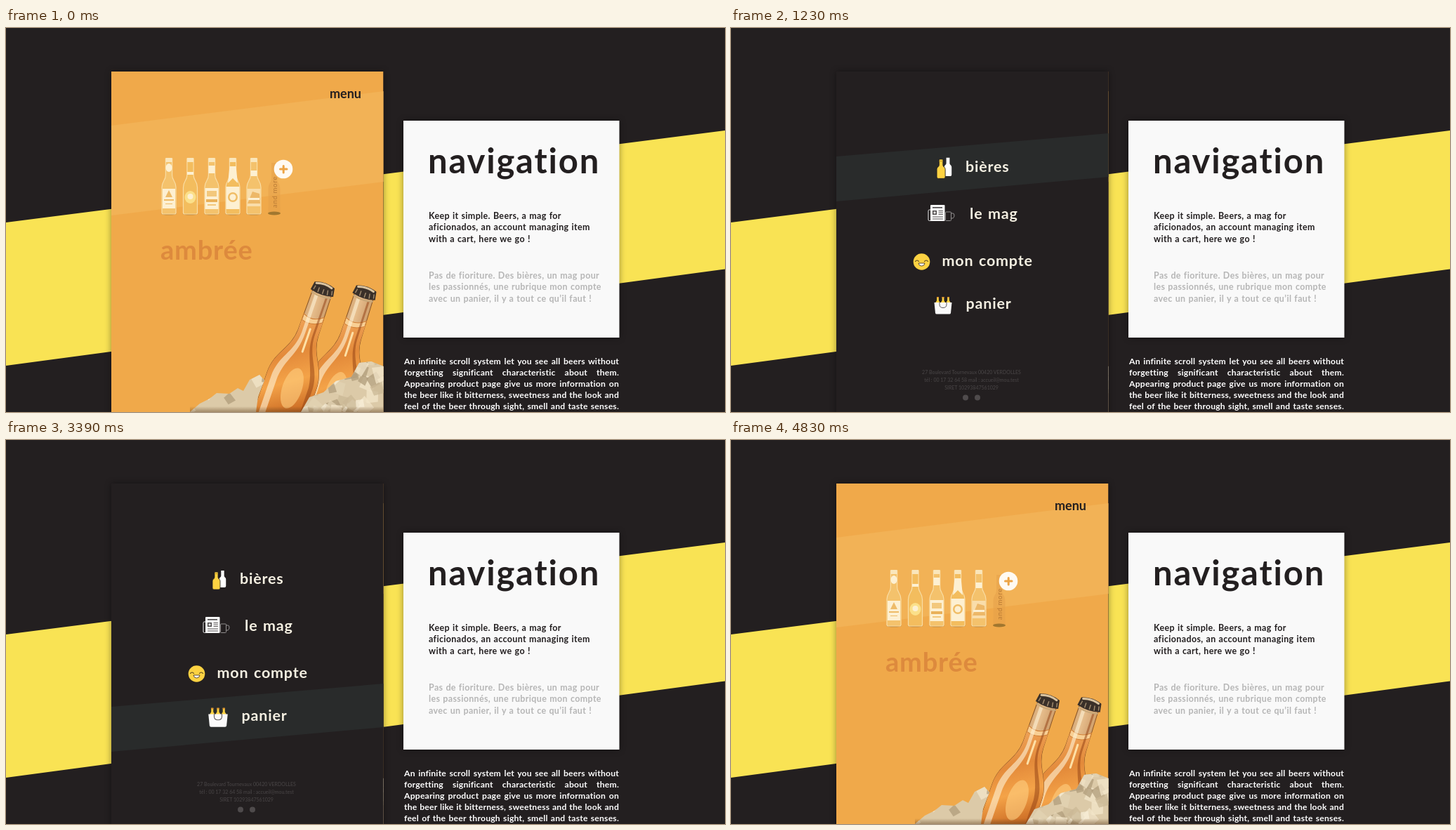
Animation of 1024 by 547 pixels, one loop 6300 ms. Source, as an HTML page:

```html
<!DOCTYPE html>
<html lang="fr">
<head>
<meta charset="utf-8">
<title>Navigation</title>
<style>
html, body { margin: 0; width: 100%; height: 100%; overflow: hidden; background: #231f20; }
body { position: relative; font-family: Lato, "Open Sans", sans-serif; font-weight: 700; }
svg { position: absolute; left: 0; top: 0; }
.shadow { filter: drop-shadow(0 0 5px #0006); }
.copy { font-size: 12.5px; letter-spacing: .35px; word-spacing: .6px; }
.item { font-size: 21.5px; letter-spacing: .8px; word-spacing: 1.5px; fill: #f5f0e2; }
.legal { font-size: 7px; font-weight: 400; fill: #4a4647; text-anchor: middle; }
#notes { position: absolute; left: 567px; top: 467px; width: 306px; color: #fff;
  font-size: 12.2px; letter-spacing: .2px; line-height: 16px; }
#notes div { white-space: nowrap; text-align: justify; text-align-last: justify; }
</style>
</head>
<body>
<svg id="stage" width="1024" height="547" viewBox="0 0 1024 547"></svg>
<div id="notes">
  <div>An infinite scroll system let you see all beers without</div>
  <div>forgetting significant characteristic about them.</div>
  <div>Appearing product page give us more information on</div>
  <div>the beer like it bitterness, sweetness and the look and</div>
  <div>feel of the beer through sight, smell and taste senses.</div>
</div>
<script>
const LOOP = 6300, WIDTH = 387.5;
const DARK = '#231f20', ORANGE = '#f0a94a', YELLOW = '#fcd242';

const rect = (x, y, w, h, fill, extra = '') =>
  `<rect x="${x}" y="${y}" width="${w}" height="${h}" fill="${fill}" ${extra}/>`;
const poly = (points, fill, extra = '') => `<polygon points="${points}" fill="${fill}" ${extra}/>`;
const path = (d, fill, extra = '') => `<path d="${d}" fill="${fill}" ${extra}/>`;
const line = (d, color, width) =>
  path(d, 'none', `stroke="${color}" stroke-width="${width}" stroke-linecap="round"`);
const ellipse = (x, y, rx, ry, fill, extra = '') =>
  `<ellipse cx="${x}" cy="${y}" rx="${rx}" ry="${ry}" fill="${fill}" ${extra}/>`;
const text = (x, y, s, attrs = '') => `<text x="${x}" y="${y}" ${attrs}>${s}</text>`;
const lines = (x, y, step, list, attrs) =>
  list.map((s, i) => text(x, y + i * step, s, attrs)).join('');

// Bottle outline standing on top + h
function bottle(cx, top, w, h, fill, extra) {
  const n = w * .23, b = w / 2, neck = top + h * .3, body = top + h * .52, end = top + h;
  return path(`M${cx - n} ${top}H${cx + n}V${neck}C${cx + n} ${top + h * .4} ${cx + b} ${top + h * .4} ${cx + b} ${body}
    V${end - 2}Q${cx + b} ${end} ${cx + b - 2} ${end}H${cx - b + 2}Q${cx - b} ${end} ${cx - b} ${end - 2}
    V${body}C${cx - b} ${top + h * .4} ${cx - n} ${top + h * .4} ${cx - n} ${neck}Z`, fill, extra);
}

function shelf() {
  const cream = '#fdf0d2';
  const labels = [
    x => rect(x - 9, 229, 18, 28, cream) + poly(`${x},231 ${x + 5},241 ${x - 5},241`, '#eebb68')
      + rect(x - 7, 244, 14, 2, '#eebb68') + rect(x - 5, 250, 10, 1, '#eebb68') + ellipse(x, 199, 4.5, 6, cream),
    x => ellipse(x, 241, 8, 9, '#fbe08a') + ellipse(x, 240, 4, 4, cream) + rect(x - 4.5, 205, 9, 4, cream),
    x => rect(x - 9.5, 228, 19, 30, cream) + rect(x - 7, 232, 14, 8, '#f3c87c')
      + rect(x - 8, 244, 16, 4, '#e9b15a') + rect(x - 6, 251, 12, 2, '#f3c87c') + rect(x - 4.5, 196, 9, 11, cream),
    x => rect(x - 9.5, 226, 19, 32, cream) + ellipse(x, 241, 7, 7, '#f0bd66') + ellipse(x, 241, 4.5, 4.5, cream)
      + poly(`${x - 4.5},197 ${x + 4.5},197 ${x + 7},221 ${x},214 ${x - 7},221`, cream),
    x => rect(x - 9.5, 229, 19, 25, '#f9ddaa') + poly(`${x - 9},250 ${x - 2},233 ${x + 8},236 ${x + 9},250`, '#edb868')
      + rect(x - 8, 242, 16, 3, cream) + rect(x - 4.5, 203, 9, 8, cream)
  ];
  return [232, 262.5, 293, 323, 353].map((x, i) =>
    ellipse(x, 264.5, 11, 2, '#a97d3d', 'opacity=".7"')
    + bottle(x, 186, 20, 79, i % 2 ? '#f3bd5e' : '#f4c26c', 'stroke="#f9dda4" stroke-width="1.2"')
    + rect(x - 4.5, 185, 9, 6, '#fae6bb') + labels[i](x)).join('')
    + bottle(382, 192, 17, 72, '#e5a04a', 'opacity=".55"')
    + ellipse(382, 264, 9, 2.5, '#a1772f')
    + text(0, 0, 'and more', 'transform="translate(386 256) rotate(-90)" font-size="9.5" letter-spacing=".7" font-weight="400" fill="#b87a35"')
    + ellipse(395, 201, 13.3, 13.3, '#fffaf2')
    + line('M390.5 201h9.500M395.200 196.500v9.500', '#eda445', 3);
}

function ice() {
  let seed = 7, out = '';
  const rnd = () => (seed = seed * 16807 % 2147483647) / 2147483647;
  const tones = ['#f8efd9', '#e3d3b3', '#cbb996', '#f3e6ca', '#b09c7b'];
  for (let i = 0; i < 75; i++) {
    const x = 262 + rnd() * 280, y = 470 + rnd() * 80, r = 6 + rnd() * 9, turn = rnd() * 6.3;
    const corners = [0, 1, 2, 3].map(k => {
      const a = turn + k * 1.57 + rnd() * .5;
      return (x + r * Math.cos(a)).toFixed(1) + ',' + (y + r * Math.sin(a)).toFixed(1);
    });
    out += poly(corners.join(' '), tones[i % 5], 'opacity=".75"');
  }
  return `<g clip-path="url(#heap)">${rect(255, 460, 290, 90, '#dccaa8')}${out}</g>`;
}

// Beer bottle hanging from its cap, leaning by angle
function glass(x, y, angle) {
  return `<g transform="translate(${x} ${y}) rotate(${angle})">
    ${path('M-14 8L-15 68C-16 98 -37 108 -37 140V215H37V140C37 108 16 98 15 68L14 8Z', 'url(#glass)', 'stroke="#8a5526" stroke-width="1"')}
    ${path('M-15 50Q0 56 15 46V68C16 98 37 108 37 140V215H-37V140C-37 108 -16 98 -15 68Z', 'url(#beer)')}
    ${path('M-14.500 44Q0 52 14.500 40V48Q0 58 -14.500 53Z', '#f8cf94', 'stroke="#d07f35" stroke-width="1"')}
    ${path('M-9 13L-9 70C-10 102 -30 112 -30 144V215H-21V146C-21 116 -4 104 -4 70V13Z', '#fff3d8', 'opacity=".6"')}
    ${path('M10 12V70C11 100 31 112 32 142V212H26V142C23 114 8 100 7 70V12Z', '#8f3f12', 'opacity=".5"')}
    ${ellipse(4, 150, 14, 30, '#ffcf80', 'opacity=".6"')}
    ${line('M1 62V96', '#ffe0a6', 3)}
    ${path('M-15 -4Q0 -10 15 -4L17 8Q0 13 -17 8Z', '#3a3029')}
    ${line('M-12 -3Q0 -7 11 -3', '#d9c3a0', 3)}
    ${line('M-13 6l1 -5M-6 8v-6M1 8.500v-6M8 8l-1 -6M14 6l-1 -5', '#a08a6d', 1.5)}
    ${line('M-14 11Q0 15 14 11', '#c9a878', 2)}
  </g>`;
}

const page = rect(150, 62, WIDTH, 485, ORANGE)
  + poly('150,139 538,90 538,219 150,267', '#f2b256')
  + text(461, 100, 'menu', `font-size="18" fill="${DARK}"`)
  + shelf()
  + text(220, 330, 'ambrée', 'font-size="38" letter-spacing=".8" fill="#dd8a3d"')
  + glass(512, 375, 18) + glass(452.5, 370, 19) + ice()
  + rect(262, 539, 276, 8, 'url(#floor)');

// Menu entries: band top, label position, icon centre and drawing
const items = [
  { band: 150, x: 333, y: 205, label: 'bières', cx: 303.5, cy: 199,
    icon: bottle(308.5, 186, 9.5, 24, '#fff') + bottle(299.5, 188, 11, 25, YELLOW, `stroke="${DARK}" stroke-width=".8"`)
      + rect(297, 190, 5, 1, '#c59a24') },
  { band: 217, x: 340, y: 272, label: 'le mag', cx: 0, cy: 0,
    icon: rect(281, 259, 5, 15.5, DARK, 'rx="1.5" stroke="#e8e8e8"') + rect(284, 252, 20.5, 23, '#fafafa', 'rx="1"')
      + rect(287, 255, 14, 1.6, '#4a4748') + rect(287, 260, 6, 6, '#4a4748') + rect(288.5, 261.5, 3, 3, '#fafafa')
      + line('M296 260.5h5.5M296 263h5.5M296 265.5h5.5M287.5 269h14M287.5 272h14', '#5d595a', 1)
      + `<g id="empty">${rect(305.5, 262, 8, 12.5, DARK, 'rx="1" stroke="#918e8e"')}${line('M314 264h2q2 0 2 3t-2 4h-2', '#918e8e', 1)}</g>`
      + `<g id="full">${line('M315 263h2.5q2.5 0 2.5 4t-2.5 5H315', '#fff', 1.6)}${rect(305.5, 260, 10, 15.5, YELLOW, 'rx="1.5"')}`
      + line('M308.5 264v8M312.5 264v8', '#e2a92c', 1)
      + path('M305 262v-2q0-3 3-3q3-2 5 0q3 0 3 3v2q-2 1-3-.5q-2 2-4 0q-2 2-4 .5Z', '#fff') + '</g>' },
  { band: 286, x: 300.5, y: 339, label: 'mon compte', cx: 271.5, cy: 333,
    icon: ellipse(271.5, 333, 11.8, 11.8, YELLOW) + line('M262.5 332.5q2.5-3 5 0M275.5 332.5q2.5-3 5 0', '#4c3a1b', 1.1)
      + path('M267 335h9q-.5 4-4.5 4t-4.5-4Z', '#fff', 'stroke="#4c3a1b" stroke-width=".9"') },
  { band: 347, x: 334.5, y: 400, label: 'panier', cx: 302, cy: 396,
    icon: [294.5, 302, 309.5].map(x => bottle(x, 383, 6, 16, YELLOW) + rect(x - 1.5, 383, 3, 1.5, '#e08f2c')).join('')
      + path('M289.5 391H314.5L313 406Q312.8 407.5 311 407.5H293Q291.2 407.5 291 406Z', '#fafafa')
      + line('M297 391v3q0 4.5 5 4.5t5-4.5v-3', '#5d595a', 1) }
];

const menu = rect(150, 62, WIDTH + 2, 485, DARK)
  + items.map(m => poly(`150,${m.band + 33} 538,${m.band} 538,${m.band + 62} 150,${m.band + 97}`, '#292b2b', 'class="band"')).join('')
  + items.map(m => `<g class="icon">${m.icon}</g>${text(m.x, m.y, m.label, 'class="item"')}`).join('')
  + lines(342.5, 492.5, 11, ['27 Boulevard Tournevaux 00420 VERDOLLES',
    'tél : 00 17 32 64 58 mail : accueil@mou.test', 'SIRET 10293847561029'], 'class="legal"')
  + ellipse(334, 526.5, 4, 4, '#4f4b4c') + ellipse(351, 526.5, 4, 4, '#4f4b4c');

const stage = document.getElementById('stage');
stage.innerHTML = `<defs>
    <clipPath id="screen">${rect(150, 62, WIDTH, 485, DARK)}</clipPath>
    <clipPath id="heap">${path('M262 547L276 535L290 528L300 520L318 521L330 513L338 517L347 501L361 494L368 502L359 525L356 547ZM420 547L432 526L452 519L470 503L492 497L503 477L520 475L538 482V547Z')}</clipPath>
    <linearGradient id="glass">
      <stop offset="0" stop-color="#b98450"/><stop offset=".45" stop-color="#e6bd8c"/>
      <stop offset="1" stop-color="#b47a45"/></linearGradient>
    <linearGradient id="beer" x1="0" y1="0" x2=".3" y2="1">
      <stop offset="0" stop-color="#f2ab62"/><stop offset=".4" stop-color="#e38a3a"/>
      <stop offset=".65" stop-color="#f4a348"/><stop offset="1" stop-color="#c25f1c"/></linearGradient>
    <linearGradient id="floor" x1="0" y1="0" x2="0" y2="1">
      <stop offset="0" stop-color="#5a3a18" stop-opacity="0"/><stop offset="1" stop-color="#5a3a18" stop-opacity=".45"/></linearGradient>
  </defs>
  ${rect(0, 0, 1024, 547, DARK)}
  ${poly('0,277 1024,146 1024,343.5 0,481', '#f9e354')}
  ${rect(150, 62, WIDTH, 500, DARK, 'class="shadow"')}
  ${rect(566, 132, 307.5, 309, '#f9f9f9', 'class="shadow"')}
  ${text(601, 207, 'navigation', `font-size="49" letter-spacing="1.8" fill="${DARK}"`)}
  ${lines(602, 272, 16.3, ['Keep it simple. Beers, a mag for', 'aficionados, an account managing item',
    'with a cart, here we go !'], `class="copy" fill="${DARK}"`)}
  ${lines(602, 357, 16.3, ['Pas de fioriture. Des bières, un mag pour', 'les passionnés, une rubrique mon compte',
    'avec un panier, il y a tout ce qu’il faut !'], 'class="copy" fill="#b6b6b6"')}
  <g clip-path="url(#screen)">${page}<g id="menu">${menu}</g></g>`;

function bezier(x1, y1, x2, y2) {
  const at = (s, a, b) => 3 * (1 - s) ** 2 * s * a + 3 * (1 - s) * s * s * b + s ** 3;
  return x => {
    if (x <= 0) return 0;
    if (x >= 1) return 1;
    let lo = 0, hi = 1;
    for (let i = 0; i < 24; i++) {
      const mid = (lo + hi) / 2;
      if (at(mid, x1, x2) < x) lo = mid; else hi = mid;
    }
    return at(lo, y1, y2);
  };
}
const openEase = bezier(.31, 0, .03, 1);
const closeEase = bezier(.4, 0, .2, 1);
const fadeEase = bezier(.25, .1, .25, 1);

const panel = document.getElementById('menu');
const empty = document.getElementById('empty'), full = document.getElementById('full');
const bands = stage.querySelectorAll('.band');
const icons = stage.querySelectorAll('.icon');
const labels = stage.querySelectorAll('.item');

function draw(now) {
  const t = now % LOOP;
  const shown = openEase((t - 30) / 690) - closeEase((t - 4230) / 600);
  panel.setAttribute('transform', `translate(${WIDTH * (1 - shown)} 0)`);
  items.forEach((m, i) => {
    const start = 870 + 720 * i;
    const hover = fadeEase((t - start) / 360) - fadeEase((t - start - 720) / (i === 3 ? 240 : 360));
    bands[i].setAttribute('opacity', hover);
    labels[i].setAttribute('transform', `translate(${hover} 0)`);
    if (i === 1) {
      empty.setAttribute('opacity', 1 - hover);
      full.setAttribute('opacity', hover);
    } else {
      icons[i].setAttribute('transform',
        `translate(${m.cx} ${m.cy}) scale(${1 + .1 * hover}) translate(${-m.cx} ${-m.cy})`);
    }
  });
}

const begin = performance.now();
(function tick() {
  draw(performance.now() - begin);
  requestAnimationFrame(tick);
})();
</script>
</body>
</html>
```
